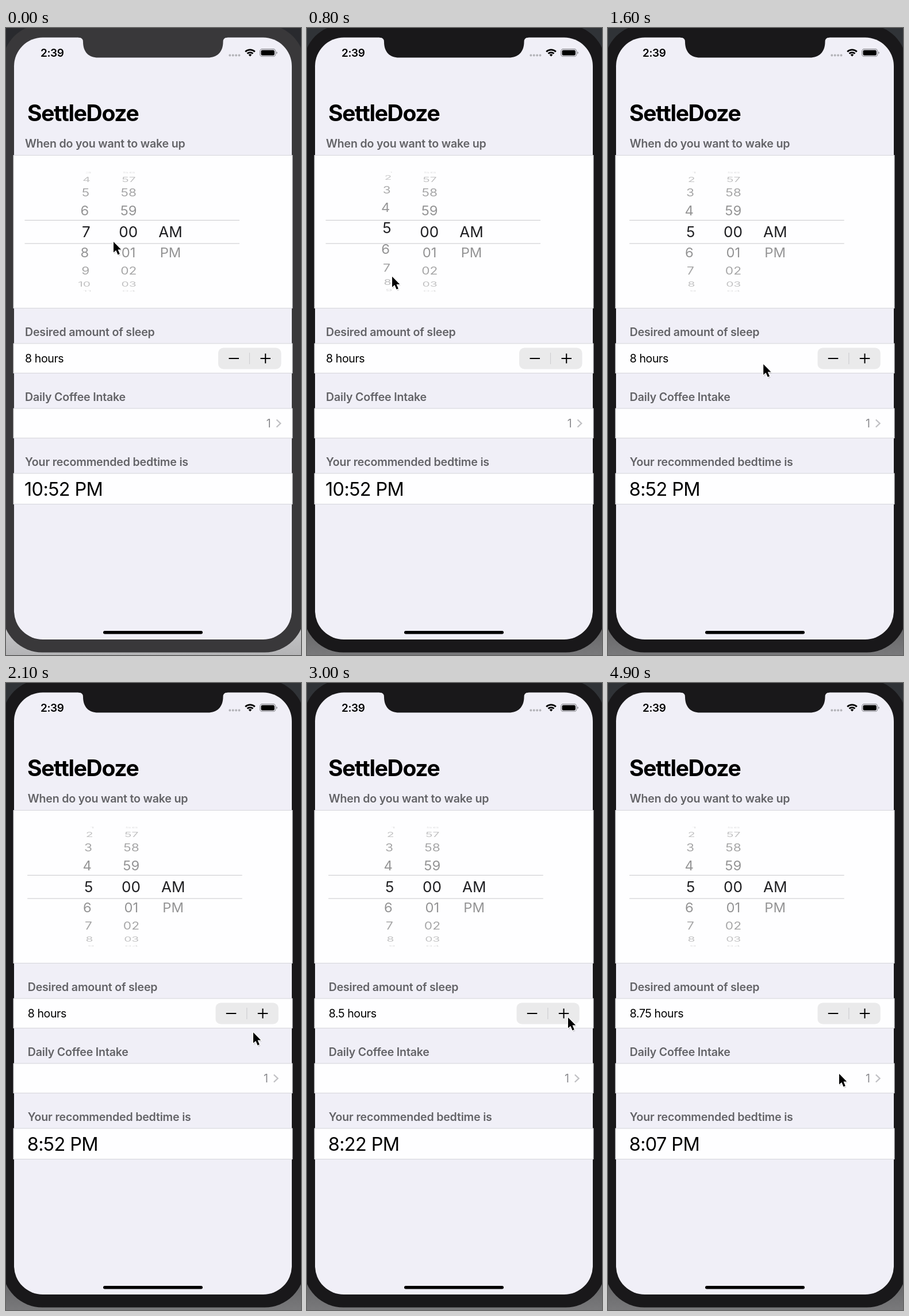
Recreate the animation shown at these times as an HTML page. Size 513 px wide and 1091 px high, loop 5000 ms.

```html
<!DOCTYPE html>
<html lang="en">
<head>
<meta charset="utf-8">
<title>Bedtime planner</title>
<style>
  html, body { margin: 0; width: 100%; height: 100%; overflow: hidden; background: #2e3135; }
  svg { display: block; width: 513px; height: 1091px; font-family: Inter, "Liberation Sans", sans-serif; }
  .head { font-size: 19.6px; font-weight: 600; letter-spacing: -.01em; fill: #636367; }
  .body { font-size: 19.6px; letter-spacing: -.022em; }
  .time { font-size: 32.5px; letter-spacing: -.02em; }
  .wheel { font-size: 23.8px; }
</style>
</head>
<body>
<svg viewBox="0 0 513 1091" xmlns="http://www.w3.org/2000/svg">
  <defs>
    <clipPath id="band"><rect x="14" y="335" width="483" height="39.5"/></clipPath>
    <clipPath id="around">
      <rect x="14" y="240" width="483" height="94"/>
      <rect x="14" y="375.5" width="483" height="94"/>
    </clipPath>
    <clipPath id="pill"><rect x="369" y="556.5" width="109.5" height="37" rx="9"/></clipPath>
    <linearGradient id="floor" x1="0" y1="0" x2="0" y2="1">
      <stop id="floorTop" offset="0"/><stop id="floorEnd" offset="1"/>
    </linearGradient>
  </defs>

  <rect id="sky" width="513" height="545"/>
  <rect y="990" width="513" height="101" fill="url(#floor)"/>
  <g id="bezel">
    <rect x="-6" y="-6" width="525" height="1092.5" rx="69"/>
    <rect x="14" y="16.5" width="483" height="1047.5" rx="50" fill="#f0eff7"/>
    <path d="M126 15.5V16.5Q134 16.5 134 24C134 42 144 51.5 160 51.5H351C367 51.5 377.5 42 377.5 24Q377.5 16.5 385 16.5V15.5Z"/>
  </g>

  <text x="60" y="49.7" font-size="19" font-weight="600" letter-spacing="-.4">2:39</text>
  <path d="M389.3 47.5H406" stroke="#b3b3b8" stroke-width="4" stroke-linecap="round" stroke-dasharray="0 5.4"/>
  <g fill="none" stroke="#000" stroke-width="2.8">
    <path d="M416.2 41.2A12 12 0 0 1 432.8 41.2M419.5 44.6A7.3 7.3 0 0 1 429.5 44.6"/>
    <path d="M424.5 49.5L421.7 46.7A4 4 0 0 1 427.3 46.7Z" fill="#000" stroke="none"/>
  </g>
  <rect x="441.7" y="36.7" width="27" height="12.8" rx="3.8" fill="none" stroke="#8b8b90" stroke-width="1.2"/>
  <rect x="443.5" y="38.5" width="23.4" height="9.2" rx="2.3"/>
  <path d="M470.2 41Q472 42 472 43.1T470.2 45.2Z" fill="#8b8b90"/>

  <text x="37" y="161.5" font-size="39" font-weight="700" letter-spacing="-.035em">SettleDoze</text>

  <g fill="#fefeff" stroke="#d5d5da">
    <rect x="13" y="221.5" width="485" height="266"/>
    <rect x="13" y="549" width="485" height="51.5"/>
    <rect x="13" y="662" width="485" height="51.5"/>
    <rect x="13" y="775" width="485" height="53.5"/>
  </g>
  <path class="edge" d="M13.5 200V850M497.5 200V850"/>

  <g id="left">
    <text class="head" x="33" y="208">When do you want to wake up</text>
    <text class="head" x="33" y="536">Desired amount of sleep</text>
    <text class="head" x="33" y="649">Daily Coffee Intake</text>
    <text class="head" x="33" y="762">Your recommended bedtime is</text>
    <path d="M32.500 334.500H406M32.500 375H406" stroke="#c9c9cc" stroke-width="1.2"/>
    <g id="outer" class="wheel" clip-path="url(#around)"></g>
    <g id="inner" class="wheel" clip-path="url(#band)"></g>
    <text id="hours" class="body" x="33" y="582"></text>
    <text id="bed" class="time" x="32" y="814"></text>
  </g>

  <g id="right">
    <g clip-path="url(#pill)">
      <rect x="369" y="556" width="110" height="38" fill="#eaeaeb"/>
      <rect id="press" x="423.5" y="556" width="55" height="38" fill="#d2d2d5"/>
    </g>
    <path d="M423.5 565V585" stroke="#cfcfd2" stroke-width="1.2"/>
    <path d="M387.5 575H405M442.5 575H460M451.2 566.5V583.5" stroke="#000" stroke-width="2"/>
    <text class="body" x="460.3" y="695" text-anchor="end" fill="#8b8b8f">1</text>
    <path d="M470.5 681.500L477.300 688L470.500 694.500" fill="none" stroke="#c0c0c4" stroke-width="2.3"/>
  </g>

  <rect x="169" y="1049" width="173" height="5.400" rx="2.700"/>

  <g id="cursor">
    <path d="M1 2.5V21.5L5.5 17.5L9 25L12.5 23.5L9.5 16H15Z" opacity=".14"/>
    <path d="M0 0V18.6L4.3 14.7L7.6 22.4L10.8 21L7.5 13.500H13.200Z" stroke="#fff" stroke-width="2.4" paint-order="stroke" stroke-linejoin="round"/>
  </g>
</svg>
<script>
const NS = "http://www.w3.org/2000/svg";
const $ = id => document.getElementById(id);
const LOOP = 5000, STEP = 100;
const MID = 354.5, RADIUS = 104, PITCH = 20.4 * Math.PI / 180, ZOOM = 1.075;
const DRAG = [300, 900], PULL = 89, SLACK = 15, ROW = 37;
const FOCUS = 200, WOKE = 1100, CLICKS = [2500, 2900, 3600];

function set(el, attrs) {
  for (const k in attrs) el.setAttribute(k, attrs[k]);
}
function add(parent, tag, attrs) {
  const el = document.createElementNS(NS, tag);
  set(el, attrs);
  return parent.appendChild(el);
}
function ease(t, from, to) {
  const p = Math.min(1, Math.max(0, (t - from) / (to - from)));
  return p * p * (3 - 2 * p);
}
const pad = n => String(n).padStart(2, "0");

// Picker columns: label(n) gives the row text, or "" when there is none.
const columns = [
  { x: 143.8, zoomX: 146.7, lean: 6, anchor: "end", label: n => String((n + 11) % 12 + 1) },
  { x: 213, zoomX: 212.7, lean: 1, anchor: "middle", label: n => pad((n + 60) % 60) },
  { x: 286, zoomX: 286, lean: 0, anchor: "middle", label: n => ["AM", "PM"][n] || "" }
];
for (const col of columns) {
  const make = (id, fill) => add($(id), "text", { y: 8.6, "text-anchor": col.anchor, fill });
  col.rows = [];
  for (let k = -5; k <= 5; k++) {
    col.rows.push({ k, far: make("outer", "#000"), near: make("inner", "#1f1f22") });
  }
}

// Rows sit on a cylinder; the middle band shows a magnified copy.
function turn(col, value) {
  const base = Math.round(value);
  for (const { k, far, near } of col.rows) {
    const a = (base + k - value) * PITCH, c = Math.cos(a);
    const wide = .757 + .26 * c, dy = RADIUS * Math.sin(a);
    far.textContent = near.textContent = Math.abs(a) < 1.53 ? col.label(base + k) : "";
    set(far, {
      transform: `translate(${col.x + col.lean * (1 - c)} ${MID + dy}) scale(${wide} ${c})`,
      opacity: Math.max(0, .05 + .39 * c)
    });
    set(near, { transform: `translate(${col.zoomX} ${MID + dy * ZOOM}) scale(${wide * ZOOM} ${c * ZOOM})` });
  }
}

// Each pointer move eases to a new place.
const home = { x: 187, y: 372 };
const moves = [
  { from: 0, to: 300, x: 149, y: 350 },
  { from: DRAG[0], to: DRAG[1], x: 148, y: 350 + PULL },
  { from: 1400, to: 1700, x: 313, y: 636 },
  { from: 1800, to: 2100, x: 430, y: 608 },
  { from: 2100, to: 2400, x: 454, y: 582 },
  { from: 3900, to: 4200, x: 452, y: 600 },
  { from: 4500, to: 4900, x: 402, y: 680 }
];
function pointer(t) {
  return moves.reduce((at, m) => {
    const p = ease(t, m.from, m.to);
    return { x: at.x + (m.x - at.x) * p, y: at.y + (m.y - at.y) * p };
  }, home);
}

function bedtime(wake, sleep) {
  const m = ((wake - sleep) * 60 - 8 + 1440) % 1440;
  return `${Math.floor(m / 60) % 12 || 12}:${pad(m % 60)} ${m < 720 ? "AM" : "PM"}`;
}

function draw(ms) {
  const t = Math.floor(ms % LOOP / STEP) * STEP;
  const active = t >= FOCUS, woke = t >= WOKE;
  set($("bezel"), { fill: active ? "#19181a" : "#39383a" });
  set($("sky"), { fill: active ? "#303337" : "#292a2e" });
  set($("floorTop"), { "stop-color": active ? "#515153" : "#d6d6d8" });
  set($("floorEnd"), { "stop-color": active ? "#79797b" : "#b4b4b6" });

  const inset = woke ? 4.7 : 0;
  set($("left"), { transform: `translate(${inset} 0)` });
  set($("right"), { transform: `translate(${-inset} 0)` });

  turn(columns[0], 7 - Math.max(0, PULL * ease(t, ...DRAG) - SLACK) / ROW);
  const sleep = 8 + .25 * CLICKS.filter(at => t >= at).length;
  $("hours").textContent = sleep + " hours";
  $("bed").textContent = bedtime(woke ? 5 : 7, sleep);
  set($("press"), { opacity: CLICKS.includes(t) ? 1 : 0 });

  const { x, y } = pointer(t);
  set($("cursor"), { transform: `translate(${x} ${y})` });
}

turn(columns[1], 0);
turn(columns[2], 0);
const start = performance.now();
function tick() {
  draw(performance.now() - start);
  requestAnimationFrame(tick);
}
tick();
</script>
</body>
</html>
```
